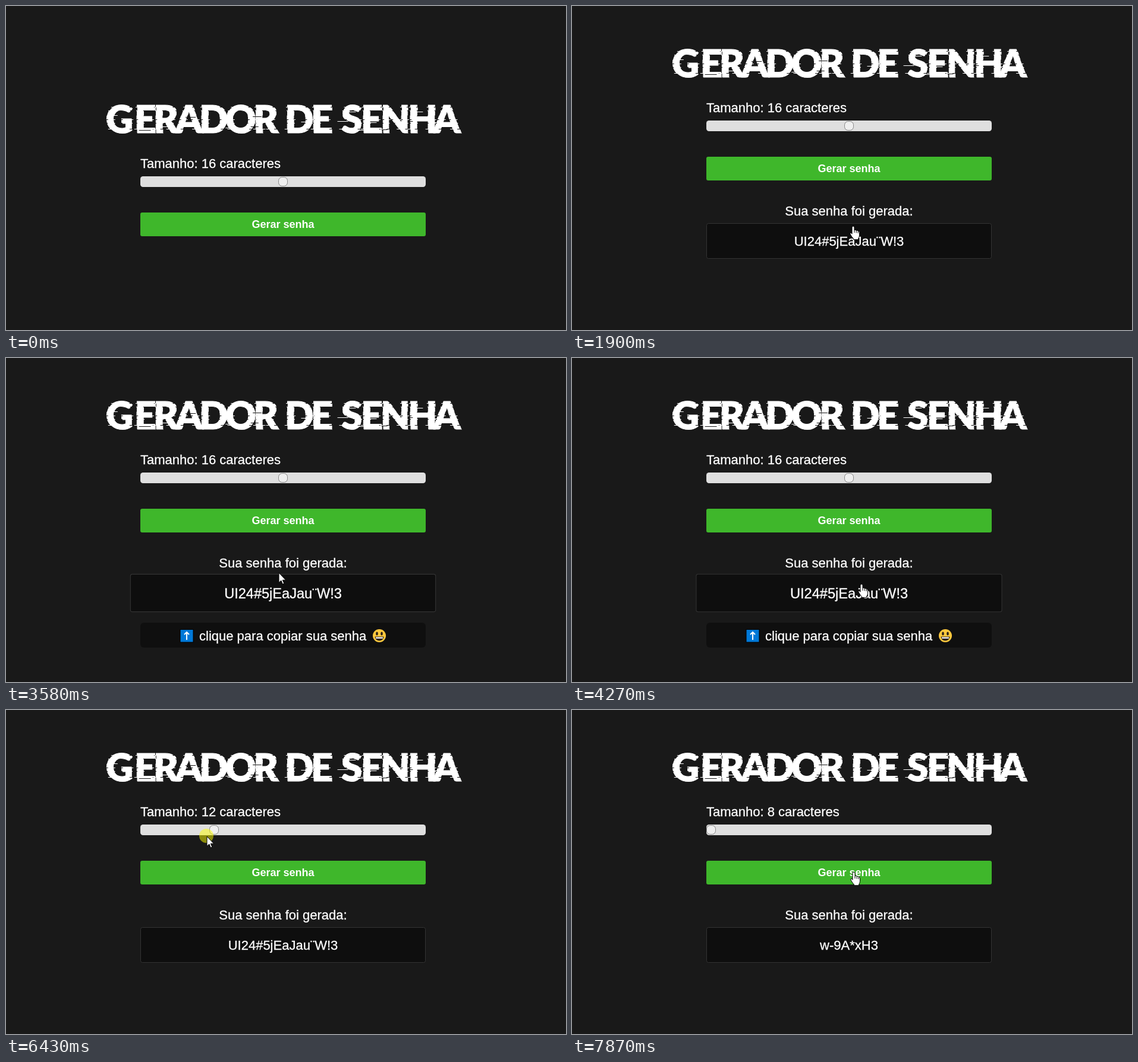
These frames come from a looping animation (942 px wide and 546 px high, 8000 ms). An HTML page:

```html
<!DOCTYPE html>
<html lang="pt">
<head>
<meta charset="utf-8">
<title>Gerador de senha</title>
<style>
  html, body { margin: 0; width: 100%; height: 100%; overflow: hidden; background: #191919; }
  svg { display: block; }
  text { font: 22px "Liberation Sans", Arial, sans-serif; fill: #fff; stroke: #fff; stroke-width: .3px; }
  .mid { text-anchor: middle; }
  #title { font: 900 64px Lato, sans-serif; stroke-width: 1px; }
  #button { font-size: 18px; font-weight: bold; stroke: none; }
  #arrow, #hand { fill: #fff; stroke: #000; }
</style>
</head>
<body>
<svg id="stage" width="942" height="546" viewBox="0 0 942 546">
  <defs>
    <text id="title" y="214" x="168 216 248 285 325 369 416 455 469 513 550 564 597 630 676 719">GERADOR DE SENHA</text>
  </defs>

  <g id="form">
    <g id="glitch"></g>
    <text id="label" x="226" y="273"></text>
    <rect x="226" y="287" width="480" height="18" rx="4.5" fill="#dfdfdf"/>
    <rect id="thumb" x="-7.5" y="288.5" width="15" height="15" rx="6" fill="#efefef" stroke="#858585"/>
    <rect x="226" y="348" width="480" height="40" rx="3" fill="#3fb72b"/>
    <text id="button" class="mid" x="466" y="374">Gerar senha</text>
  </g>

  <g id="result">
    <text class="mid" x="466" y="353">Sua senha foi gerada:</text>
    <g id="box">
      <rect x="-239.5" y="-29.5" width="479" height="59" rx="3" fill="#0e0e0e" stroke="#333"/>
      <text id="password" class="mid" y="8"></text>
    </g>
    <g id="hint">
      <rect x="226" y="446" width="480" height="42" rx="6" fill="#0f0f0f"/>
      <rect x="293" y="457.5" width="22" height="21.5" fill="#0078d7" stroke="#000"/>
      <path d="M304 475V462M300 466l4-4 4 4" fill="none" stroke="#fff" stroke-width="2"/>
      <text x="325" y="476">clique para copiar sua senha</text>
      <circle cx="628" cy="468" r="11" fill="#ffc83d"/>
      <ellipse cx="624" cy="464.5" rx="1.8" ry="3" fill="#2b2118"/>
      <ellipse cx="632" cy="464.5" rx="1.8" ry="3" fill="#2b2118"/>
      <path d="M620.5 469.5h15a7.5 7 0 0 1-15 0z" fill="#2b2118"/>
      <path d="M622 470.5h12v2.2h-12z" fill="#fff"/>
    </g>
  </g>

  <g id="cursor">
    <circle id="press" cx="-1" cy="-1" r="12" fill="#ff0" fill-opacity=".5"/>
    <path id="arrow" d="M0 0V16.5L3.8 13L6.3 19L8.8 18L6.3 12.2H11.6Z"/>
    <g id="hand">
      <path d="M-2 2a2 2 0 0 1 4 0v5a2 2 0 0 1 3.2.6a2 2 0 0 1 3 1a1.8 1.8 0 0 1 2.3 1.6v5q0 3-2 6v1.5h-8v-1.5q-3-3-5-7q-1.5-2.5.3-3q1.2 0 2.2 2z"/>
      <path d="M2 7v4M5.2 8v3.5M8.2 9v3" fill="none"/>
    </g>
  </g>
</svg>

<script>
const $ = id => document.getElementById(id);
const LOOP = 8000, SHOWN = 1900, FORM_RISE = 94;
const clamp = p => Math.max(0, Math.min(1, p));
const smooth = p => p * p * (3 - 2 * p);
const easeOut = p => 1 - (1 - clamp(p)) ** 2.1;
const between = (t, a, b) => t >= a && t < b;
const show = (id, on) => $(id).setAttribute('visibility', on ? 'visible' : 'hidden');
const place = (id, x, y, scale = 1) =>
  $(id).setAttribute('transform', `translate(${x} ${y}) scale(${scale})`);

// The title is cut into rows; thin rows slip sideways, and short streaks cross the letters.
function buildGlitch() {
  let seed = 11;
  const random = () => (seed = seed * 16807 % 2147483647) / 2147483647;
  let markup = '';
  for (let y = 165, thin = false; y < 217; thin = !thin) {
    const height = thin ? 1 : 5 + Math.floor(random() * 5);
    const shift = (random() - 0.5) * (thin ? 10 : 2);
    markup += `<svg y="${y}" width="942" height="${height}" viewBox="${-shift} ${y} 942 ${height}"><use href="#title"/></svg>`;
    y += height;
  }
  for (let i = 0; i < 26; i++) {
    const x = 167 + random() * 575, y = 178 + Math.floor(random() * 32);
    markup += `<rect x="${x}" y="${y}" width="${6 + random() * 14}" height="1" fill="${i % 3 ? '#fff' : '#191919'}"/>`;
  }
  $('glitch').innerHTML = markup;
}

// time, x, y
const moves = [
  [530, 877, 532], [1300, 473, 372], [1429, 473, 372], [1430, 473, 371],
  [4270, 487, 381], [4540, 487, 381], [5230, 470, 203], [5960, 470, 203],
  [6430, 338, 213], [6860, 202, 213], [6910, 202, 213], [7400, 474, 273]
];

function pointer(t) {
  if (between(t, 1430, 4270)) {
    const angle = (205 + (t - 2800) * 841 / 1470) * Math.PI / 180;
    const blend = smooth(clamp((t - SHOWN) / 400));
    const mix = (from, to) => from + (to - from) * blend;
    return [mix(473, 436.4 + 61 * Math.cos(angle)), mix(371, 409.6 + 51 * Math.sin(angle))];
  }
  const next = moves.findIndex(move => move[0] > t);
  if (next < 1) return moves.at(next).slice(1);
  const [t0, x0, y0] = moves[next - 1], [t1, x1, y1] = moves[next];
  const linear = (t - t0) / (t1 - t0);
  const p = between(t, 5960, 6860) ? linear : smooth(linear);
  return [x0 + (x1 - x0) * p, y0 + (y1 - y0) * p];
}

// Alternating times at which the pointer enters and leaves the password box.
const hovers = [1910, 2477, 2708, 3106, 3350, 3735, 4020, 4680];

function boxScale(t) {
  return hovers.reduce((scale, start, i) => {
    if (t < start) return scale;
    const end = Math.min(t, hovers[i + 1] ?? t);
    return scale + ((i % 2 ? 1 : 1.075) - scale) * easeOut((end - start) / 300);
  }, 1);
}

function hintOpacity(t) {
  if (t >= 5960) return 0;
  if (t > 4700) return 1 - 0.91 * clamp((t - 4700) / 520);
  return smooth(clamp((t - 1950) / 500));
}

function sliderValue(t) {
  if (t < 5960) return 16;
  const [x] = pointer(Math.min(t, 6900) - 70);
  return Math.max(8, Math.round((x - 238) / 29 + 8));
}

function render(t) {
  const shown = t >= SHOWN, rise = shown ? FORM_RISE : 0;
  place('form', 0, -rise);
  show('result', shown);

  const value = sliderValue(t);
  $('label').textContent = `Tamanho: ${value} caracteres`;
  place('thumb', 234 + (value - 8) * 29, 0);

  $('password').textContent = t < 7800 ? 'UI24#5jEaJau¨W!3' : 'w-9A*xH3';
  place('box', 466, 396, boxScale(t));
  $('hint').setAttribute('opacity', hintOpacity(t));

  const [x, y] = pointer(t), visible = t >= 530;
  const overButton = between(x, 226, 706) && between(y, 348 - rise, 388 - rise);
  const overBox = shown && between(x, 226, 706) && between(y, 364, 428);
  const pointing = overButton || overBox;
  place('cursor', Math.round(x), Math.round(y));
  show('hand', visible && pointing);
  show('arrow', visible && !pointing);
  show('press', between(t, 1830, SHOWN) || between(t, 5960, 6900) || between(t, 7730, 7870));
}

buildGlitch();
const start = performance.now();
function tick() {
  render((performance.now() - start) % LOOP);
  requestAnimationFrame(tick);
}
tick();
</script>
</body>
</html>
```
